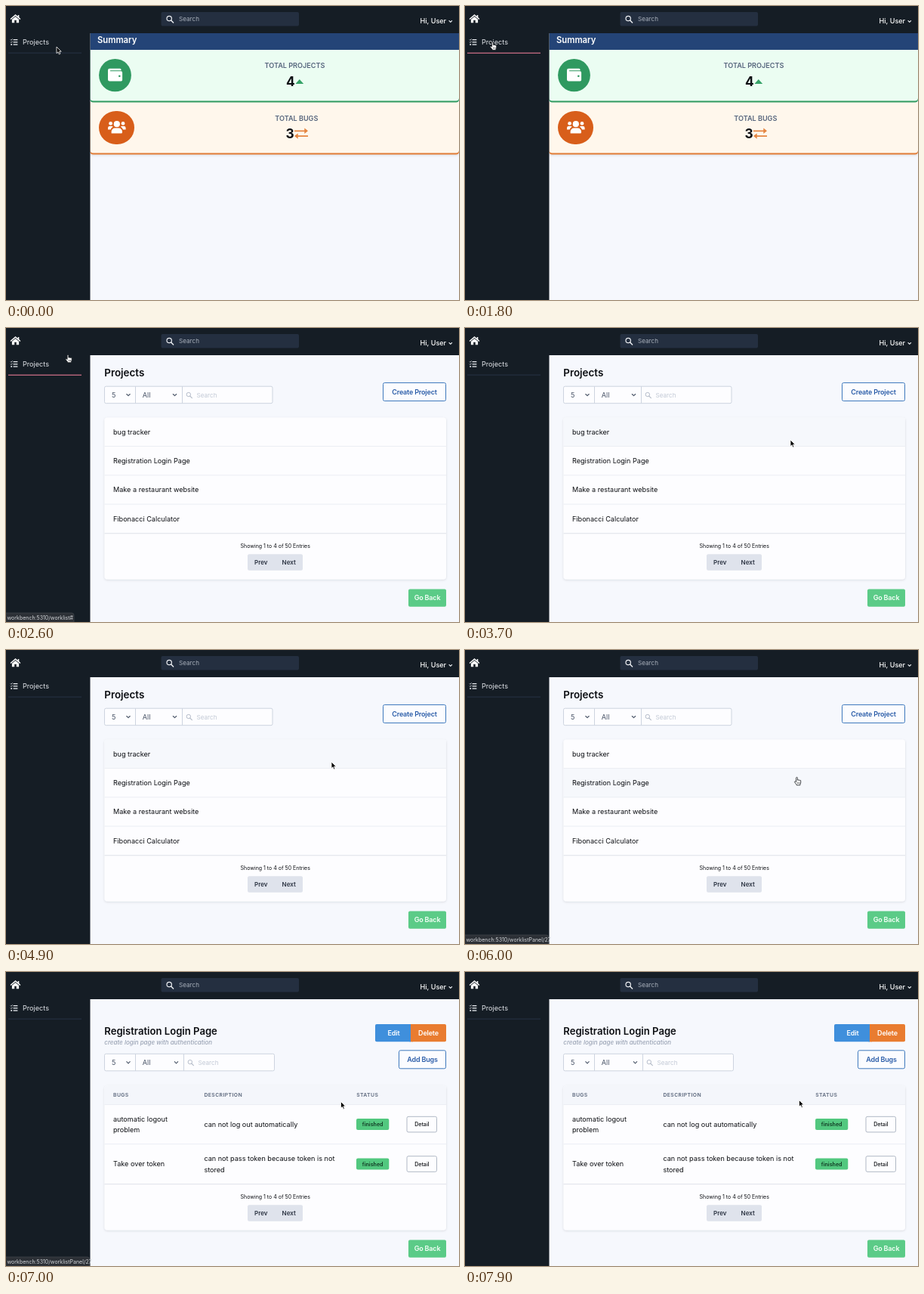
These frames come from a looping animation (600x389 px, 8 s). An HTML page:

```html
<!DOCTYPE html>
<html lang="en">
<head>
<meta charset="utf-8">
<title>Bug tracker</title>
<style>
html, body { margin: 0; width: 100%; height: 100%; overflow: hidden; background: #151d25; }
svg { display: block; width: 600px; height: 389px; font-family: Inter, "Open Sans", sans-serif; }
text { white-space: pre; }
</style>
</head>
<body>
<svg id="stage" viewBox="0 0 600 389" xmlns="http://www.w3.org/2000/svg"></svg>
<script>
const LOOP = 8000, STEP = 100;
const INK = '#0c0e12', SLATE = '#4a5568', LINE = '#eceef4', EDGE = '#cdd4df';

const attrs = o => Object.entries(o).map(([k, v]) => ` ${k}="${v}"`).join('');
const rect = (x, y, w, h, fill, more = {}) =>
  `<rect${attrs({ x, y, width: w, height: h, fill, ...more })}/>`;
const text = (x, y, size, str, fill = INK, weight = 400, more = {}) =>
  `<text${attrs({ x, y, 'font-size': size, fill, 'font-weight': weight, ...more })}>${str}</text>`;
const mid = (x, y, size, str, fill, weight, more = {}) =>
  text(x, y, size, str, fill, weight, { 'text-anchor': 'middle', ...more });
const path = (d, fill, more = {}) => `<path${attrs({ d, fill, ...more })}/>`;
const stroke = (d, color, width = 1, more = {}) =>
  path(d, 'none', { stroke: color, 'stroke-width': width, ...more });
const group = (id, body, more = {}) => `<g${attrs({ id, ...more })}>${body}</g>`;

const round = { 'stroke-linecap': 'round', 'stroke-linejoin': 'round' };
const tight = { 'letter-spacing': '-.02em' };
const chevron = (x, y, r, color) =>
  stroke(`M${x - r} ${y - r / 2}l${r} ${r}l${r} ${-r}`, color, 1.1, round);
const lens = (x, y, r, color, w) =>
  `<circle${attrs({ cx: x, cy: y, r, fill: 'none', stroke: color, 'stroke-width': w })}/>` +
  stroke(`M${x + r * .75} ${y + r * .75}l${r * .95} ${r * .95}`, color, w * 1.15, round);

function button(x, y, w, h, label, fill, color, border) {
  const more = border ? { rx: 2, stroke: border, 'stroke-width': 1 } : { rx: 2 };
  return rect(x, y, w, h, fill, more) + mid(x + w / 2, y + h / 2 + 3.3, 9, label, color, 600, tight);
}

function chrome() {
  const home = path('M12.5 11L5.6 16.9L6.5 18L12.5 12.9L18.5 18L19.4 16.9L17.3 15.1V11.9H15.7V13.7Z', '#fff') +
    path('M7.9 17.7L12.5 13.9L17.1 17.7V22.2H13.8V18.8H11.2V22.2H7.9Z', '#fff');
  let tasks = '';
  for (const y of [44.6, 47.8, 51]) tasks += rect(9.6, y - .6, 5.8, 1.3, '#e8ebef');
  tasks += stroke('M6 44.4l.9 .9l1.6-1.8M6 47.6l.9 .9l1.6-1.8', '#e8ebef', .9) +
    '<circle cx="7.2" cy="51" r="1" fill="#e8ebef"/>';
  return rect(0, 0, 600, 36, '#151d25') + rect(0, 36, 111.5, 353, '#151d25') + home + tasks +
    rect(205.5, 8, 182.5, 18.5, '#242f40', { rx: 2 }) + lens(216.2, 16.5, 3.2, '#eef0f3', 1.2) +
    text(229, 20.4, 8.15, 'Search', '#a9b0bb') +
    text(548.5, 23, 9.1, 'Hi, User', '#fff', 500) + chevron(588.8, 20.4, 1.8, '#e4e7eb') +
    text(22, 51.2, 9.15, 'Projects', '#e2e5ea') +
    rect(3, 61.6, 97, 1, '#263245', { id: 'under' });
}

function summary() {
  const card = (y, bg, edge) =>
    path(`M111.5 ${y}H600V${y + 65.5}a4 4 0 0 1 -4 4H115.5a4 4 0 0 1 -4 -4Z`, edge) +
    path(`M111.5 ${y}H600V${y + 63.5}a4 4 0 0 1 -4 4H115.5a4 4 0 0 1 -4 -4Z`, bg);
  const wallet = path('M137.2 82.8H151a1.5 1.5 0 0 1 1.5 1.5V85.2H138.4a.5 .5 0 0 0 0 1H152.4a1.7 1.7 0 0 1 1.7 1.7V97.8a1.7 1.7 0 0 1 -1.7 1.7H137.2a2.2 2.2 0 0 1 -2.2 -2.2V85a2.2 2.2 0 0 1 2.2 -2.2Z', '#fff') +
    '<circle cx="150.3" cy="92.7" r="1.3" fill="#2f9960"/>';
  const head = (x, y, r) => `<circle cx="${x}" cy="${y}" r="${r}" fill="#fff"/>`;
  const users = head(146.8, 156.2, 4.1) + head(138.6, 155.4, 2.4) + head(155, 155.4, 2.4) +
    path('M139.6 168.6V166.2a4.6 4.6 0 0 1 4.6 -4.6H149.4a4.6 4.6 0 0 1 4.6 4.6V167.3a1.3 1.3 0 0 1 -1.3 1.3Z', '#fff') +
    path('M135 163.6V161.3a2.4 2.4 0 0 1 2.4 -2.4H140a2.4 2.4 0 0 1 1.8 .8a6.5 6.5 0 0 0 -3.2 3.9Z', '#fff') +
    path('M158.6 163.6V161.3a2.4 2.4 0 0 0 -2.4 -2.4H153.6a2.4 2.4 0 0 0 -1.8 .8a6.5 6.5 0 0 1 3.2 3.9Z', '#fff');
  const swap = path('M382 164.4H395.3V161.6L400 165.3L395.3 169V166.2H382ZM400 171.2H386.7V168.4L382 172.1L386.7 175.8V173H400Z', '#e58540');
  return rect(111.5, 36, 488.5, 22, '#244477') + text(121, 49.2, 11.3, 'Summary', '#fff', 600) +
    `<g filter="url(#soft)">${card(127, '#fff7ec', '#e07b36')}</g>` +
    card(58, '#ebfdf2', '#2f9a60') +
    '<ellipse cx="144.5" cy="91.6" rx="21.4" ry="21.7" fill="#2f9960"/>' + wallet +
    rect(123, 139, 47, 44, '#d85e1a', { rx: 22.5 }) + users +
    mid(382.5, 82, 9.1, 'TOTAL PROJECTS', '#56657d', 600) +
    text(371, 106, 17.3, '4', INK, 700) + path('M383.4 103L388.8 97L394.2 103Z', '#36a368') +
    mid(384.8, 151.5, 9.1, 'TOTAL BUGS', '#56657d', 600) +
    text(370.6, 175.3, 17.3, '3', INK, 700) + swap;
}

function filters(y, split, right) {
  const h = 22.5, base = y + 14.6;
  return rect(130.5, y, right - 130.5, h, '#fdfdff', { rx: 2, stroke: EDGE }) +
    stroke(`M171.5 ${y}v${h}M${split} ${y}v${h}`, EDGE) +
    text(140, base, 9.1, '5', SLATE) + chevron(162, y + 11.4, 2.2, SLATE) +
    text(180.8, base, 9.1, 'All', SLATE) + chevron(split - 10, y + 11.4, 2.2, SLATE) +
    lens(split + 8.3, y + 10.8, 2.7, '#aeb6c4', .9) +
    text(split + 19, y + 14.4, 8.15, 'Search', '#c2c9d5');
}

const card = (y, h) => rect(130.5, y, 452.5, h, '#fdfdff', { rx: 4, filter: 'url(#soft)' });
const rule = (y, color = LINE) => rect(130.5, y, 452.5, 1, color);

function pager(y) {
  return rule(y - 28, '#dfe2e9') + mid(356.7, y - 8.6, 7, 'Showing 1 to 4 of 50 Entries') +
    rect(320, y, 73, 21.5, '#dfe3ec', { rx: 2 }) +
    text(329, y + 13.9, 8, 'Prev', '#2b3342', 600) + text(365.6, y + 13.9, 8, 'Next', '#2b3342', 600) +
    button(533, y + 46.2, 50, 23.3, 'Go Back', '#5bcb87', '#f5fff8');
}

function list() {
  const names = ['bug tracker', 'Registration Login Page', 'Make a restaurant website', 'Fibonacci Calculator'];
  return text(130.3, 64, 13.4, 'Projects', INK, 600) + filters(77.2, 233.5, 353) +
    button(499.5, 72.5, 83, 24, 'Create Project', '#fbfcff', '#2a5ca8', '#3f79bd') +
    card(118.5, 214) + rect(130.5, 118.5, 452.5, 38, '#f6f8fc', { id: 'hover' }) +
    names.map((n, i) => text(142, 141 + i * 38.2, 9.1, n) + (i < 3 ? rule(156 + i * 38.3) : '')).join('') +
    pager(299.3);
}

function detail() {
  const caps = (x, s) => text(x, 164.6, 6.85, s, '#5a667b', 600, { 'letter-spacing': '.4' });
  const row = (y, name, note) => {
    const lines = (x, a) => a.map((s, i) => text(x, y + 3.4 + (i - (a.length - 1) / 2) * 14.2, 9.1, s)).join('');
    return lines(142, name) + lines(262.4, note) +
      rect(464, y - 7.5, 43.3, 15, '#52c87f', { rx: 2 }) + mid(485.7, y + 2.5, 7.1, 'finished', '#123a24', 600) +
      rect(531, y - 10.3, 39.5, 20.6, '#fdfdff', { rx: 2, stroke: '#b0b8c5' }) + mid(550.8, y + 2.6, 7.1, 'Detail', INK, 500);
  };
  return text(130.3, 83, 13.1, 'Registration Login Page', INK, 600) +
    text(130.3, 96.2, 8, 'create login page with authentication', '#9aa3b4', 500, { 'font-style': 'italic' }) +
    button(489, 69, 49, 23.3, 'Edit', '#3f8fdc', '#fff') + button(536, 69, 47, 23.3, 'Delete', '#e97c30', '#fff') +
    rect(534.5, 69, 1.5, 23.3, '#3f8fdc') + rect(536, 69, 3, 23.3, '#e97c30') +
    filters(108.3, 235.5, 355.5) +
    button(520.5, 103.8, 62, 24, 'Add Bugs', '#fbfcff', '#2a5ca8', '#3f79bd') +
    card(150.5, 191) + path('M130.5 175V154.5a4 4 0 0 1 4 -4H579a4 4 0 0 1 4 4V175Z', '#f4f6fb') +
    caps(142, 'BUGS') + caps(262.4, 'DESCRIPTION') + caps(464.2, 'STATUS') +
    rule(175) + rule(227.2) +
    row(201.6, ['automatic logout', 'problem'], ['can not log out automatically']) +
    row(254, ['Take over token'], ['can not pass token because token is not', 'stored']) +
    pager(308.2);
}

const arrow = path('M0 0V8.6L2 6.8L3.3 9.9L4.8 9.2L3.5 6.2H6.2Z', '#000',
  { stroke: '#fff', 'stroke-width': .8, 'stroke-linejoin': 'round' });
const hand = path('M-.9 .8a.9 .9 0 0 1 1.8 0V3.7a.8 .8 0 0 1 1.5 .2a.8 .8 0 0 1 1.5 .3a.7 .7 0 0 1 1.3 .5V7.2L4.4 9.2V10.3H-.4V9.5L-2.9 6.4a.8 .8 0 0 1 1.1 -1.1L-.9 6.1Z', '#fff',
  { stroke: '#15181c', 'stroke-width': .8, 'stroke-linejoin': 'round' }) +
  stroke('M1 6.6V8.6M2.3 6.6V8.6M3.6 6.6V8.6', '#15181c', .5);

const stage = document.getElementById('stage');
stage.innerHTML =
  '<defs><filter id="soft" x="-5%" y="-10%" width="110%" height="125%">' +
  '<feDropShadow dx="0" dy="1" stdDeviation="1.6" flood-color="#1a2030" flood-opacity=".13"/></filter></defs>' +
  rect(0, 0, 600, 389, '#f6f8fd') +
  group('summary', summary()) + group('list', list()) + group('detail', detail()) + chrome() +
  group('status', path('M0 377H0a3 3 0 0 1 3 3V389H0Z', '#2c3036', { id: 'bar', stroke: '#474c53', 'stroke-width': .6 }) +
    text(1.5, 386, 7, '', '#d6d9dd', 400, { id: 'url' })) +
  group('arrow', arrow) + group('hand', hand);

const $ = id => document.getElementById(id);
const show = (id, on) => $(id).setAttribute('display', on ? 'inline' : 'none');

// time, x, y of the pointer tip
const route = [
  [0, 67, 54], [200, 67, 54], [900, 36.5, 48], [2100, 36.5, 48], [2600, 82, 35.5], [2700, 90, 37],
  [3500, 431, 148], [4900, 431, 148], [5400, 438, 167], [5800, 439.5, 168.5],
  [6800, 439.5, 168.5], [7000, 443.5, 171.5], [7700, 443.5, 171.5], [7900, 442.5, 169.5], [8000, 442.5, 169.5]
];

function pointer(t) {
  let i = 1;
  while (i < route.length - 1 && route[i][0] < t) i++;
  const [a, ax, ay] = route[i - 1], [b, bx, by] = route[i];
  const u = (t - a) / (b - a), e = u * u * (3 - 2 * u);
  return [ax + (bx - ax) * e, ay + (by - ay) * e];
}

const within = (t, a, b) => t >= a && t < b;

function render(t) {
  const [x, y] = pointer(t);
  const page = t < 2000 ? 'summary' : t < 6900 ? 'list' : 'detail';
  for (const id of ['summary', 'list', 'detail']) show(id, id === page);

  const nav = within(t, 1000, 2800);
  $('under').setAttribute('fill', nav ? '#b9667c' : '#263245');
  $('under').setAttribute('height', nav ? 1.4 : 1);

  show('hover', within(t, 3400, 6900));
  $('hover').setAttribute('y', y > 156.5 ? 157 : 118.5);

  const onLink = nav || within(t, 5200, 6900);
  show('arrow', !onLink);
  show('hand', onLink);
  $(onLink ? 'hand' : 'arrow').setAttribute('transform', `translate(${x.toFixed(2)} ${y.toFixed(2)})`);

  const first = within(t, 2300, 2900), second = within(t, 5300, 7300);
  show('status', first || second);
  const w = first ? 90 : 110.5;
  $('bar').setAttribute('d', `M-1 377H${w - 3}a3 3 0 0 1 3 3V390H-1Z`);
  $('url').textContent = first ? 'workbench:5310/worklist#' : 'workbench:5310/worklistPanel/27';
}

const start = performance.now();
function tick() {
  const t = (performance.now() - start) % LOOP;
  render(Math.floor(t / STEP) * STEP);
  requestAnimationFrame(tick);
}
tick();
</script>
</body>
</html>
```
